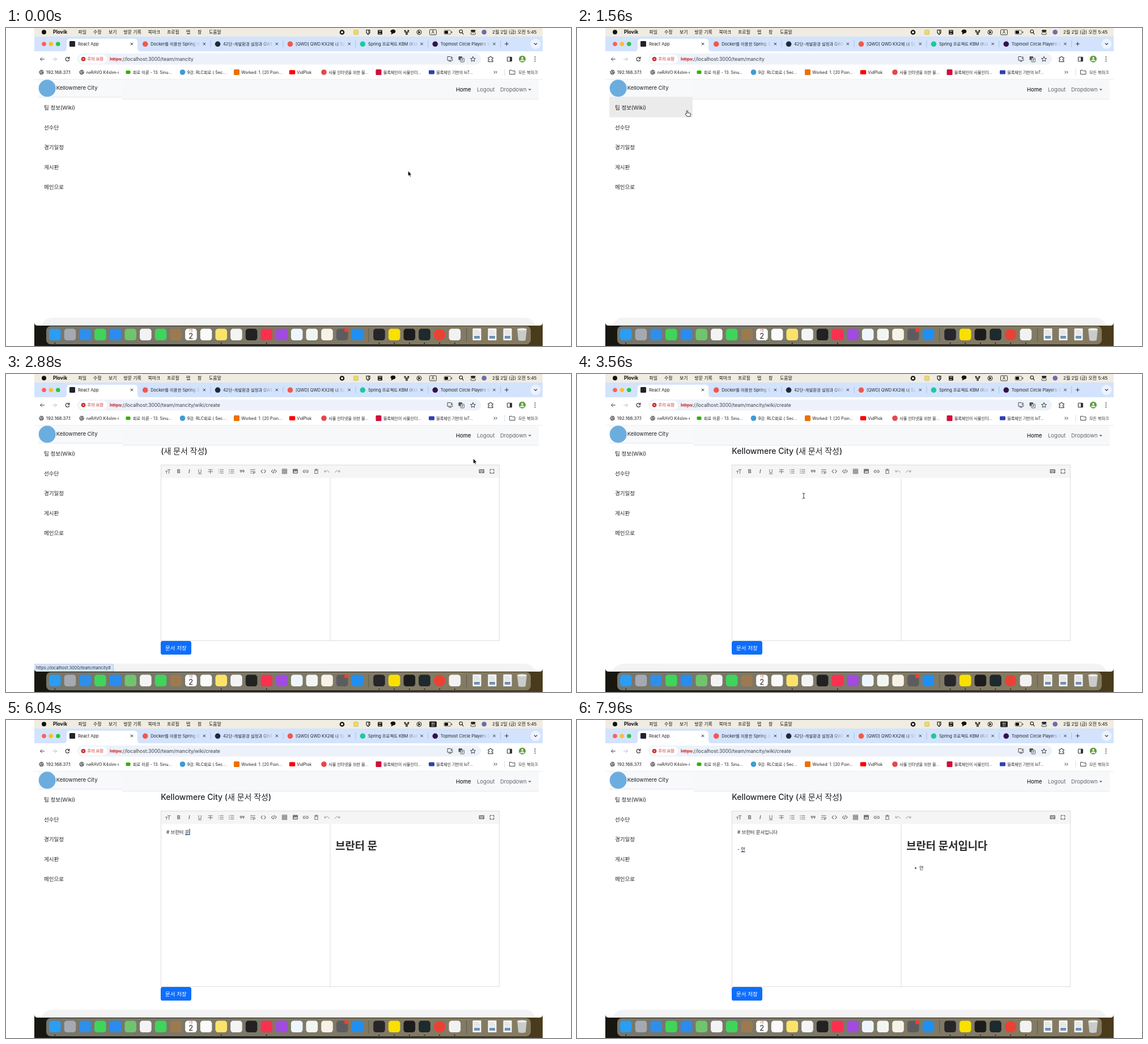
An HTML page for the animation above (8000 ms loop, 997x561 px).

```html
<!DOCTYPE html>
<html lang="ko">
<head>
<meta charset="utf-8">
<title>Team wiki</title>
<style>
  html, body { margin: 0; width: 100%; height: 100%; overflow: hidden; background: #fff; }
  svg { display: block; }
  text { white-space: pre; font-family: Inter, "Noto Sans CJK KR", "Noto Sans CJK", sans-serif; }
</style>
</head>
<body>
<svg id="stage" width="997" height="561" viewBox="0 0 997 561"></svg>
<script>
const LOOP = 8000;
const TEAM = 'Kellowmere City';
const HOST = '://localhost:3000/team/mancity';

// Shape helpers; text is centred vertically on y.
const rect = (x, y, w, h, fill, r = 0, more = '') =>
  `<rect x="${x}" y="${y}" width="${w}" height="${h}" rx="${r}" fill="${fill}" ${more}/>`;
const dot = (x, y, r, fill, more = '') =>
  `<circle cx="${x}" cy="${y}" r="${r}" fill="${fill}" ${more}/>`;
const text = (x, y, str, size, fill = '#222', more = '') =>
  `<text x="${x}" y="${(y + size * .36).toFixed(2)}" font-size="${size}" fill="${fill}" ${more}>${str}</text>`;
const line = (x, y, d, color = '#444', width = 1, fill = 'none') =>
  `<path transform="translate(${x} ${y})" d="${d}" fill="${fill}" stroke="${color}" stroke-width="${width}" stroke-linecap="round" stroke-linejoin="round"/>`;
const group = (id, body) => `<g id="${id}">${body}</g>`;

const defs = `<defs>
  <linearGradient id="wall"><stop offset="0" stop-color="#17170f"/><stop offset=".6" stop-color="#25231a"/><stop offset="1" stop-color="#4a3c1c"/></linearGradient>
  <linearGradient id="dockFill"><stop offset="0" stop-color="#77766c"/><stop offset="1" stop-color="#857b62"/></linearGradient>
  <linearGradient id="fade"><stop offset="0" stop-color="#d3e3fd" stop-opacity="0"/><stop offset="1" stop-color="#d3e3fd"/></linearGradient>
  <clipPath id="window"><path d="M50 15H947V519Q947 525 941 525H56Q50 525 50 519Z"/></clipPath>
</defs>`;

function menuBar() {
  const items = [[127.5, '파일'], [154, '수정'], [181, '보기'], [207.5, '방문 기록'], [250.5, '북마크'],
    [284, '프로필'], [318, '탭'], [338, '창'], [358, '도움말']];
  return rect(50, 0, 897, 15, '#f0ece1') + dot(67, 7.3, 4, '#111') +
    text(83, 7.3, 'Plovik', 8.5, '#111', 'font-weight="700"') +
    items.map(([x, s]) => text(x, 7.3, s, 7.9, '#111')).join('') +
    dot(593, 7.5, 3.2, '#f0ece1', 'stroke="#111" stroke-width="2.2"') +
    rect(613.5, 3.5, 8, 8, '#f2dc4e', 1.5, 'stroke="#aaa" stroke-width=".6"') +
    line(639, 7.5, 'M-3-4H3V1L0 4-3 1ZM1-4V1', '#111', 1.1) +
    rect(656, 3.5, 8, 8, '#222', 1) + line(660, 7.5, 'M-2-2H2M-2 2H1', '#f0ece1', 1) +
    line(683, 7, 'M-4-1Q-4-4 0-4T4-1 0 2L-3 4-2 1Q-4 1-4-1Z', '#111', 1, '#111') +
    line(707, 7.5, 'M-3-3V0M-1-1V4M3-3V0M1-1V4M-4-3H-2M2-3H4', '#111', 1.4) +
    dot(729, 7.5, 4, 'none', 'stroke="#111"') + line(729, 7.5, 'M-1-2 2 0-1 2Z', '#111', .7, '#111') +
    group('latin', rect(747.5, 3, 12, 9, 'none', 1.5, 'stroke="#222" stroke-width=".9"') +
      text(753.5, 7.5, 'A', 7, '#111', 'text-anchor="middle"')) +
    group('hangul', rect(747, 2.5, 13, 10, '#222', 1.5) +
      text(753.5, 7.4, '한', 7, '#fff', 'text-anchor="middle"')) +
    rect(773, 4, 12, 7, 'none', 2, 'stroke="#444" stroke-width=".8"') + rect(774, 5, 6, 5, '#111', 1) +
    rect(786, 6, 1.2, 3, '#444') +
    line(803, 7, 'M-3-1A2.8 2.8 0 1 1 2.6-1 2.8 2.8 0 1 1-3-1ZM2 1 4 4', '#111', 1.1) +
    rect(820, 3.3, 8.5, 3.6, '#222', 1.8) + rect(820, 8, 8.5, 3.6, 'none', 1.8, 'stroke="#222" stroke-width=".8"') +
    dot(843.7, 7.3, 4.3, '#6a6db0') + text(858, 7.3, '2월 2일 (금) 오전 5:45', 8, '#111');
}

function tabs() {
  const titles = ['Docker를 이용한 Spring 프로', '42단-개발환경 설정과 QWD', '[QWD] QWD KX2에 내 Spring',
    'Spring 프로젝트 KBM (Kaled', 'Topmost Circle Players S'];
  const marks = ['#f0594d', '#1f2a35', '#f0594d', '#20c997', '#38104a'];
  const close = x => line(x, 28, 'M-1.9-1.9 1.9 1.9M1.9-1.9-1.9 1.9', '#333', 1);
  let out = rect(50, 15, 897, 26, '#d3e3fd') +
    ['#ff5f57', '#febc2e', '#28c840'].map((c, i) => dot(67 + i * 12.4, 28.3, 3.8, c)).join('') +
    `<path d="M102 41Q107 41 107 36V25Q107 19 113 19H226Q232 19 232 25V36Q232 41 237 41Z" fill="#fff"/>` +
    rect(112, 23, 10, 10, '#20232a', 1.5) + text(127, 28, 'React App', 7.5) + close(222);
  titles.forEach((title, i) => {
    const x = 245.7 + i * 127.9;
    out += dot(x, 28.3, 4.8, marks[i]) +
      `<svg x="${x + 9}" y="18" width="86" height="20">${text(.5, 10, title, 7.4)}${rect(68, 0, 19, 20, 'url(#fade)')}</svg>` +
      close(x + 104.2) + rect(x + 115, 22, .8, 12, '#a3b9dc');
  });
  return out + line(883.5, 28, 'M-3 0H3M0-3V3', '#333', 1) +
    dot(934.5, 28, 9, '#edf3fe') + line(934.5, 28, 'M-2.3-1 0 1.4 2.3-1', '#333', 1.1);
}

function toolbar() {
  return rect(50, 41, 897, 50, '#fff') +
    line(64, 55, 'M3.5 0H-3.5M-.5-3-3.5 0-.5 3') + line(86, 55, 'M-3.5 0H3.5M.5-3 3.5 0 .5 3', '#bbb') +
    line(108.5, 55, 'M3 1.2A3.3 3.3 0 1 1 2.6-2M3.3-3.8V-1.2H.8', '#333', 1.2) +
    rect(126, 45, 712, 19.5, '#edf2fa', 9.7) + rect(129, 47, 49, 15.5, '#fff', 7.7) +
    dot(136.5, 54.8, 3.8, '#c5221f') + line(136.5, 54.8, 'M-1.3-1.3 1.3 1.3M1.3-1.3-1.3 1.3', '#fff', .9) +
    text(143.5, 54.8, '주의 요함', 7.2, '#c5221f') +
    `<text x="183" y="58" font-size="8.55" fill="#3c4043"><tspan fill="#c5221f">https</tspan><tspan id="path"></tspan></text>` +
    rect(183, 54.7, 21, .9, '#c5221f') +
    line(783.5, 54.5, 'M1-4H-4.5V2.5H4.5V1M-2 4.3H2M3-4V-.5M1.3-2 3-.2 4.7-2') +
    rect(798.5, 50, 6.5, 6.5, '#555', 1) + rect(802, 53, 6.5, 7, '#fff', 1, 'stroke="#555" stroke-width=".9"') +
    line(805.2, 56.5, 'M-1.7-1.3H1.7M0-2V-1.3M1.2-1.3Q0 1.5-1.6 2M-1-.3Q0 1.6 1.6 2', '#555', .7) +
    line(824, 55, 'M0-4.5 1.3-1.5 4.5-1.3 2 .8 2.8 4 0 2.3-2.8 4-2 .8-4.5-1.3-1.3-1.5Z') +
    line(855, 55, 'M-4-3H-1.5Q-1.5-5 0-5T1.5-3H4V-.5Q2.2-.5 2.2 1T4 2.2V4.5H-4V2Q-2.5 2-2.5 .8T-4-.5Z', '#333', 1.1) +
    rect(884.5, 51.2, 8, 7.6, 'none', 1, 'stroke="#333" stroke-width="1.1"') + rect(889, 51.2, 3.5, 7.6, '#333') +
    dot(911, 54.7, 6, '#5f9a3d') + dot(911, 53, 1.9, '#e6efdf') + `<path d="M907 58.5Q907 55.5 911 55.5T915 58.5Z" fill="#e6efdf"/>` +
    [51.2, 54.8, 58.4].map(y => dot(933.5, y, .95, '#333')).join('');
}

function bookmarks() {
  const globe = x => dot(x, 78, 4.3, '#666') + line(x, 78, 'M-3-2.2Q-1-.5 0-2M-3 1Q0-.5 1 2.5M1.3-1H3.2', '#fff', 1);
  const box = (c, w = 9, h = 9) => x => rect(x - w / 2, 78 - h / 2, w, h, c, 1.5);
  const disc = c => x => dot(x, 78, 4.8, c);
  const items = [
    [62.5, globe, '192.168.37.1', 8], [133.5, globe, 'neRAVO K4slim-i', 7.2],
    [215.5, box('#2db400', 8, 6), '회로 이론 - 13. Sinu...', 7.3], [311.5, disc('#3e9bd6'), '9강. RLC회로 ( Sec...', 7.3],
    [407, box('#eb7100', 10, 10), 'Worked: 1. [20 Poin...', 7.2], [505, box('#f00', 10.5, 7.5), 'VidPlok', 7.3],
    [561, disc('#e5474b'), '사물 인터넷을 위한 블...', 7.05], [657.5, box('#d0103a', 10, 10), '블록체인이 사물인터...', 7.1],
    [751, box('#2f3fb5', 10, 7), '블록체인 기반의 IoT...', 7]];
  return items.map(([x, icon, s, size]) => icon(x) + text(x + 8.2, 78, s, size)).join('') +
    line(863.5, 78, 'M-2.5-2-.5 0-2.5 2M.8-2 2.8 0 .8 2', '#333', 1) + rect(879.5, 72, .8, 12, '#c8d6ee') +
    line(893.5, 78, 'M-4.5-3.5H-1L0-2.3H4.5V3.5H-4.5Z') + text(904, 78, '모든 북마크', 7.1, '#333') +
    rect(50, 90.3, 897, .8, '#e2e5ea');
}

function page() {
  const menu = ['팀 정보(Wiki)', '선수단', '경기일정', '게시판', '메인으로'];
  return rect(205, 91, 735, 35, '#f7f8fa') + rect(205, 125.4, 735, .8, '#dfe3e8') +
    rect(57, 91, 148, 31, '#f8f9fb') + rect(57, 121.6, 148, .8, '#dcdfe3') +
    group('hover', rect(57, 122, 147, 35.5, '#ebebeb')) +
    dot(72.7, 106.3, 15, '#6caddf') + text(88.7, 105.7, TEAM, 9.5) +
    menu.map((s, i) => text(67, 140.5 + i * 34.9, s, 9.5)).join('') +
    text(794, 109, 'Home', 9.5, '#000') + text(831, 109, 'Logout', 9.5, '#61656a') + text(872, 109, 'Dropdown', 9.5, '#61656a') +
    `<path d="M921.5 107.5H927L924.2 110.3Z" fill="#61656a"/>`;
}

const wiki = () => rect(273.5, 126.5, 597.5, 59.5, '#fff', 3.5, 'stroke="#cfd1d4"') +
  rect(787, 137, 73.5, 24, '#0d6efd', 3.6) + text(795, 149, '새 문서 만들기', 9.5, '#fff') +
  text(283.5, 168.3, '존재하지 않는 위키문서', 9.4);

function editor() {
  const list = 'M-1.5-3H4M-1.5 0H4M-1.5 3H4';
  const glyph = (i, s, more) => text(286 + i * 18.68, 171.5, s, 9, '#757575', `text-anchor="middle" ${more}`);
  const icons = [
    [0, 'M-1-3H4.2M1.6-3V3.5M-4.5-.5H-1M-2.7-.5V3.5'], [4, 'M-3.5-3H3.5M0-3V3.5M-4 .5H4'],
    [5, list + 'M-4-3H-3.8M-4 0H-3.8M-4 3H-3.8'], [6, list + 'M-4-3.5V-2.5M-4-.5V.5M-4 2.5V3.5'],
    [7, 'M-3.5-2H-1V0L-2.2 2M.8-2H3.3V0L2.1 2M-3.5-2V0H-1M.8-2V0H3.3'], [8, 'M-4-3H4M-4 0H2.5Q4 0 4 1.5T2.5 3H.5M-4 3H-2M1.5 1.8 .3 3 1.5 4.2'],
    [9, 'M-1.5-2.8-4.2 0-1.5 2.8M1.5-2.8 4.2 0 1.5 2.8'], [10, 'M-2-2.5-4.5 0-2 2.5M2-2.5 4.5 0 2 2.5M.8-3.3-.8 3.3'],
    [11, 'M-4-4H4V4H-4ZM-4-1.3H4M-4 1.4H4M-1.3-4V4M1.4-4V4'],
    [13, 'M-1-2H-2.5Q-4.5-2-4.5 0T-2.5 2H-1M1-2H2.5Q4.5-2 4.5 0T2.5 2H1M-2 0H2'],
    [14, 'M-3.3-3H3.3M-1-4H1M-2.6-1.5V3.8H2.6V-1.5Z'],
    [15, 'M-4-2V1H-1M-4 1Q1-4 4.2 2'], [16, 'M4-2V1H1M4 1Q-1-4-4.2 2']];
  return group('title', '') +
    rect(273.5, 160.5, 597, 310, '#fff', 0, 'stroke="#dcdcdc"') + rect(274, 161, 596, 22.5, '#f5f5f5') +
    rect(571.5, 183.5, 1, 287, '#dedede') +
    icons.map(([i, d]) => line(286 + i * 18.68, 171.7, d, i > 14 ? '#aaa' : '#757575', 1.1)).join('') +
    glyph(1, 'B', 'font-weight="800"') + glyph(2, 'I', 'font-weight="700" font-style="italic"') + glyph(3, 'U', 'text-decoration="underline" font-weight="500"') +
    rect(506, 167.5, 9, 8, '#757575', 1) + `<path d="M507.3 174 509.5 171 511 172.7 512.5 170.7 514 174Z" fill="#f5f5f5"/>` +
    rect(834.5, 168, 9.5, 7, '#757575', 1) + line(839.2, 171.5, 'M-3-1.5H3M-3 .2H3M-1.7 2H1.7', '#f5f5f5', .8) +
    line(857.5, 171.7, 'M-3.3-1V-3.3H-1M1-3.3H3.3V-1M3.3 1V3.3H1M-1 3.3H-3.3V1', '#757575', 1.3) +
    rect(273, 471, 54, 24, '#0d6efd', 3.6) + text(281, 483.2, '문서 저장', 9.5, '#fff') +
    `<text id="row0" x="283" y="200.5" font-size="8.3" fill="#222"></text>` +
    `<text id="row2" x="283" y="230.7" font-size="8.3" fill="#222"></text>` +
    `<rect id="underline" width="7.4" height="1.2" fill="#2563c9"/><rect id="caret" width="1" height="11" fill="#111"/>` +
    text(581.3, 222, '', 18.8, '#2b2b2b', 'id="heading" font-weight="600"') +
    group('bullet', dot(597.5, 261.3, 1.3, '#222') + text(604, 261, '', 8.3, '#222', 'id="entry"'));
}

function dock() {
  const apps = ('#2a9df4 #a4a9b2 #2f8fe8 #3fd45a #2b8cf0 #6fc46c #f3f3f3 #3fd45a #9c7a50 #fff #fafafa #fbe36a #f4f4f4 #222 ' +
    '#f9314f #a14be0 #eef6fd #f2f6f2 #f7f2e8 #5c5c60 #1f8ff2').split(' ');
  const open = ['#26262b', '#f9e000', '#1c1c1c', '#1d2a2e', '#e94235', '#f2f2f2'];
  const square = (x, c) => rect(x - 10.3, 530.5, 20.6, 20.6, c, 4.8);
  const sheet = x => rect(x - 7.5, 530, 15, 21, '#f6f6f6', 1) +
    line(x, 540, 'M-5-6H3M-5-3H5M-5 0H5', '#b5bcc4', .8) + rect(x - 5, 543, 10, 5, '#6f93b5');
  return rect(71, 526, 855, 32, 'url(#dockFill)', 8) +
    apps.map((c, i) => square(86.3 + i * 26.68, c)).join('') +
    text(326.3, 533.8, '2월', 4.2, '#e0383e', 'text-anchor="middle"') + text(326.3, 543, '2', 13, '#222', 'text-anchor="middle"') +
    dot(600.5, 533, 3.6, '#ff3b30') +
    open.map((c, i) => i === 4 ? dot(765.2, 541, 10.3, c) : square(658.5 + i * 26.68, c)).join('') +
    [639.5, 812].map(x => rect(x, 530, .8, 23, '#55534b')).join('') +
    [831, 858, 885].map(sheet).join('') +
    `<path d="M902 531H919L916.8 551Q910.5 553 904.2 551Z" fill="#c9ccca"/><ellipse cx="910.5" cy="531.5" rx="8.5" ry="2" fill="#eceeec"/>` +
    [86.3, 379.8, 459.8, 658.5, 685.2, 711.9, 738.5, 765.2, 791.9].map(x => dot(x, 556, 1, '#111')).join('');
}

const status = rect(49, 511.5, 141, 14, '#b9c4d6', 2) + rect(50, 512.3, 139, 13, '#d3e3fd', 2) +
  text(53, 518.6, 'https' + HOST + '#', 7.35, '#333');

const pointers =
  group('arrow', `<path d="M0 0V9.2L2.1 7.4 3.5 10.4 5 9.7 3.7 6.8H6.4Z" fill="#000" stroke="#fff" stroke-width=".7"/>`) +
  group('hand', `<path d="M-1 0Q.2-1 1 .3V4Q2 3 3 4.2 4 3.4 4.9 4.7 6.2 4.4 6.2 5.8V7.5L5 10H-.2L-3.2 6.2Q-3.3 4.8-1.4 5.4Z" fill="#fff" stroke="#111" stroke-width=".9"/>`) +
  group('beam', line(0, 0, 'M-1.8-5Q0-5 0-3.5T1.8-5M-1.8 5Q0 5 0 3.5T1.8 5M0-3.5V3.5', '#222', .9));

document.getElementById('stage').innerHTML = defs + rect(50, 510, 897, 51, 'url(#wall)') +
  `<g clip-path="url(#window)">${rect(50, 15, 897, 510, '#fff')}${tabs()}${toolbar()}${bookmarks()}${page()}` +
  rect(62, 511, 873, 40, '#f3f3f3', 20) + group('wiki', wiki()) + group('editor', editor()) + group('status', status) + '</g>' +
  menuBar() + dock() + pointers;

const $ = id => document.getElementById(id);
const show = (id, on) => $(id).setAttribute('display', on ? 'inline' : 'none');
const place = (id, x, y) => { $(id).setAttribute('x', x); $(id).setAttribute('y', y); };

// Every keystroke's document, as the input method composes it.
const words = (head, list) => list.split(' ').map(s => head + s);
const NAME = '# 브란터 ', BODY = NAME + '문서입니다';
const strokes = ['#', '# ', ...words('# ', 'ㅂ 브 블 브라 브란 브란ㅌ 브란터'), NAME,
  ...words(NAME, 'ㅁ 무 문 문ㅅ 문서 문성 문서이 문서입 문서입ㄴ 문서입니 문서입닏 문서입니다'),
  BODY + '\n', BODY + '\n\n', BODY + '\n\n-', BODY + '\n\n- ', ...words(BODY + '\n\n- ', 'ㅇ 아 안')];
const TYPE_START = 4480, STROKE = 122;
const OPEN_WIKI = 1720, OPEN_EDITOR = 2680, TITLE_LOADED = 2960, FOCUS = 3640;

const ease = {
  in: k => k * k,
  out: k => 1 - (1 - k) ** 2,
  both: k => k * k * (3 - 2 * k)
};
const route = [[0, 709.5, 252], [520, 709.5, 252], [1400, 194.5, 146], [1700, 194.5, 146],
  [2000, 303.5, 175, 'in'], [2440, 824.5, 149, 'out'], [3000, 824.5, 149], [3560, 400, 215]];

function pointerAt(t) {
  const i = route.findIndex(p => p[0] > t);
  if (i < 0) return route.at(-1).slice(1);
  const [t0, x0, y0] = route[i - 1], [t1, x1, y1, kind = 'both'] = route[i];
  const k = ease[kind]((t - t0) / (t1 - t0));
  return [x0 + (x1 - x0) * k, y0 + (y1 - y0) * k];
}

function renderPointer(t) {
  const [x, y] = pointerAt(t);
  const overRow = x < 204 && y > 122 && y < 157;
  const overButton = t > 2000 && t < OPEN_EDITOR && x > 787 && y < 160;
  const overText = t > OPEN_EDITOR && x < 571 && y > 183;
  const kind = t >= TYPE_START ? '' : overRow || overButton ? 'hand' : overText ? 'beam' : 'arrow';
  for (const id of ['arrow', 'hand', 'beam']) {
    show(id, id === kind);
    $(id).setAttribute('transform', `translate(${x.toFixed(2)} ${y.toFixed(2)})`);
  }
  show('hover', overRow || (t >= OPEN_WIKI && t < 2040));
}

function renderEditor(t) {
  const step = Math.floor((t - TYPE_START) / STROKE);
  const doc = step < 0 ? '' : strokes[Math.min(step, strokes.length - 1)];
  const rows = doc.split('\n'), last = rows.length - 1;
  const [first, , third = ''] = rows;
  $('title').innerHTML = text(273.3, 135.8, (t < TITLE_LOADED ? '' : TEAM + ' ') + '(새 문서 작성)', 14, '#212529', 'font-weight="500"');
  $('row0').textContent = first;
  $('row2').textContent = third;
  $('heading').textContent = first.slice(2);
  $('entry').textContent = third.slice(2);
  show('bullet', third);

  const row = last === 2 ? $('row2') : $('row0');
  const end = 283 + (last === 1 ? 0 : row.getComputedTextLength());
  const y = 192 + last * 15.1;
  place('caret', end, y);
  show('caret', t >= FOCUS && t % 1000 < 600);
  show('underline', /[ㄱ-힣]$/.test(doc));
  place('underline', end - 7.5, y + 9.8);
}

function render(t) {
  const inEditor = t >= OPEN_EDITOR, inWiki = t >= OPEN_WIKI && !inEditor;
  $('path').textContent = HOST + (inEditor ? '/wiki/create' : inWiki ? '/wiki' : '');
  show('wiki', inWiki);
  show('editor', inEditor);
  show('status', t >= 1680 && t < 3160);
  show('latin', t < 4200);
  show('hangul', t >= 4200);
  if (inEditor) renderEditor(t);
  renderPointer(t);
}

const start = performance.now();
function tick() {
  render((performance.now() - start) % LOOP);
  requestAnimationFrame(tick);
}
tick();
</script>
</body>
</html>
```
